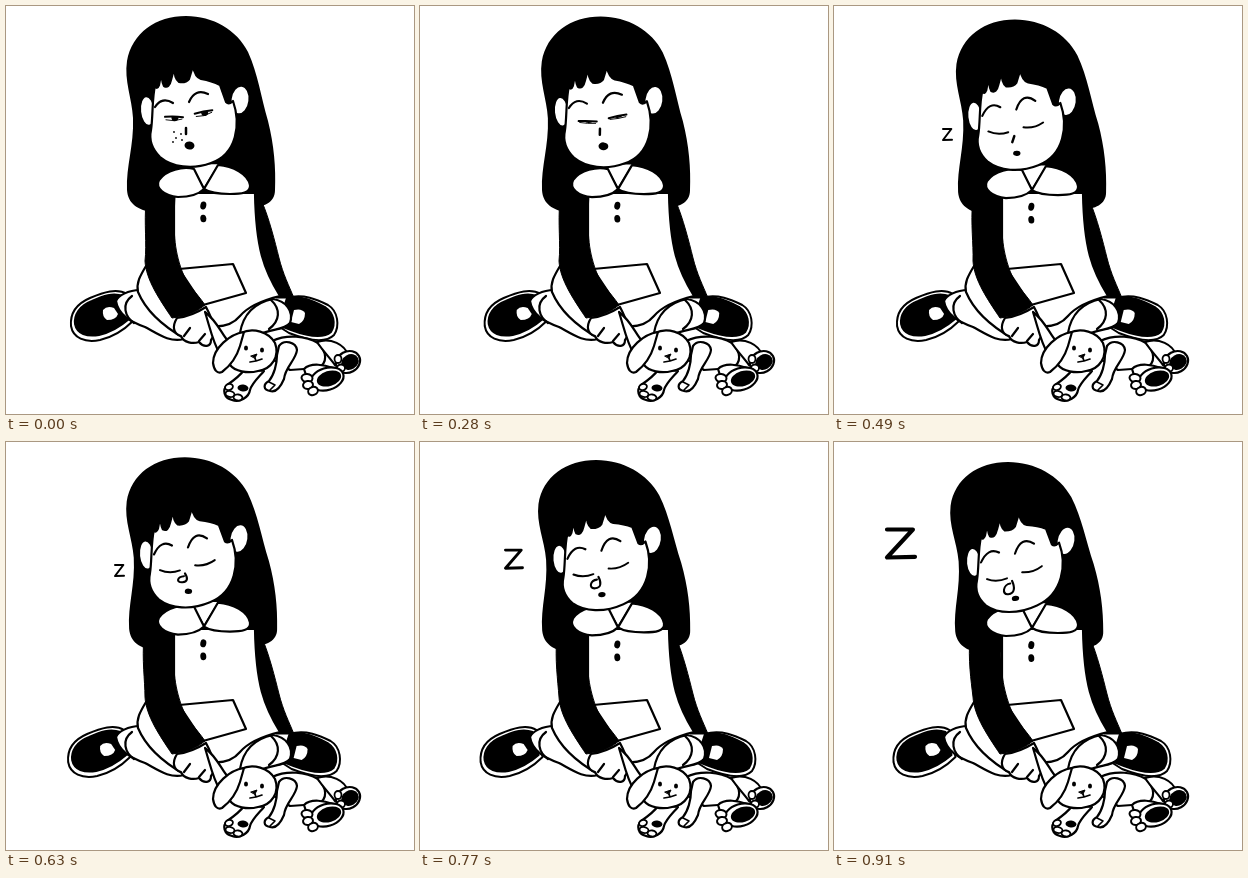
Write an HTML page with a canvas that moves like this. It is 408 by 408 pixels and loops after 980 ms.

```html
<!DOCTYPE html>
<html lang="en">
<head>
<meta charset="utf-8">
<title>Sleepy girl</title>
<style>
html, body { margin: 0; width: 100%; height: 100%; overflow: hidden; background: #fff; }
canvas { display: block; }
</style>
</head>
<body>
<canvas id="stage" width="408" height="408"></canvas>
<script>
const ctx = document.getElementById('stage').getContext('2d');
const LOOP = 980;

// start ms, nod, droop of features, eyelid, hair sway, Z progress, bubble size
const STEPS = [
  [0, 0, 0, 0, 0, -1, 0],
  [140, 0, 0, .3, 0, -1, 0],
  [210, 0, 0, .6, 0, -1, 0],
  [280, .05, .04, .8, 1, -1, 0],
  [350, .12, .1, 1, 2, -1, 0],
  [490, .35, .6, 1, 3, 0, 0],
  [630, .52, .65, 1, 2, 0, .3],
  [700, .66, .69, 1, 1.5, .24, .5],
  [770, .8, .74, 1, 1, .42, .7],
  [840, .9, .87, 1, .5, .7, .85],
  [910, 1, 1, 1, 0, 1, 1]
];

const mix = (a, b, k) => a + (b - a) * k;

function shape(d, fill = '#fff', line = 2.2) {
  const path = new Path2D(d);
  if (fill) { ctx.fillStyle = fill; ctx.fill(path); }
  if (line) { ctx.lineWidth = line; ctx.stroke(path); }
}
const stroke = (d, w = 2.2) => shape(d, null, w);

function oval(x, y, rx, ry, turn = 0, fill = '#000', line = 0) {
  ctx.beginPath();
  ctx.ellipse(x, y, rx, ry, turn, 0, 7);
  ctx.fillStyle = fill;
  ctx.fill();
  if (line) { ctx.lineWidth = line; ctx.stroke(); }
}

function within(matrix, draw) {
  ctx.save();
  ctx.transform(...matrix);
  draw();
  ctx.restore();
}
const shifted = (x, y, draw) => within([1, 0, 0, 1, x, y], draw);

function hair() {
  shape('M180 10C150 10 126 27 121 55C118 75 126 92 127 112C128 140 120 160 121 184C122 198 132 204 146 206L245 202C257 201 269 197 269 184C270 162 268 139 262 115C255 91 252 68 242 46C231 24 207 10 180 10Z', '#000', 0);
}

function leftShoe() {
  shape('M121 288C111 282 98 286 84 292C70 298 64 308 65 320C67 332 79 337 94 334C107 331 119 323 127 315Z', '#fff', 2);
  shape('M117 290C107 286 97 290 86 295C73 300 68 309 69 318C71 328 81 331 93 329C106 326 115 320 123 313Z', '#000', 2);
  shape('M97 304Q101 299 108 302L112 308Q110 314 101 314Q96 311 97 304Z', '#fff', 0);
}

function rightShoe() {
  shape('M281 292C297 287 312 294 322 299C332 305 334 320 328 329C319 338 301 334 283 327L272 320Z', '#fff', 2);
  shape('M282 292C296 289 309 296 319 301C328 307 330 318 325 326C317 333 301 330 285 324L272 319Z', '#000', 2);
  shape('M288 304Q296 302 299 307Q299 315 293 318L285 316Z', '#fff', 0);
}

function legs(nod) {
  shifted(-5.5 * nod, 0, leftShoe);
  shifted(5 * nod, 0, rightShoe);
  shape('M134 284C122 284 112 290 110 295C112 309 125 316 139 321C152 328 164 337 178 333L190 320L165 300Z');
  stroke('M126 290C115 298 119 311 128 317');
  shape('M234 327C237 309 248 297 267 293C280 295 288 305 284 317C279 324 265 323 255 328Z');
  stroke('M265 294C275 303 274 315 263 323');
}

function dress(nod) {
  shape('M246 188L256 196C263 212 269 236 273 252C277 268 283 280 288 292L270 292L246 230Z', '#000', 1);
  shape('M140 260C134 270 130 277 132 286C140 305 155 319 178 332L205 320Q224 322 234 310Q245 297 274 290C258 264 250 243 249 187L168 187L168 240Z');
  shape('M173 263L227 258L240 287L197 299Z');
  shifted(0, 3.6 * nod, () => {
    oval(197.3, 199.5, 3, 4, .2);
    oval(197.3, 212.5, 3, 3.8, -.1);
  });
  const x = 140 - 4 * nod;
  shape(`M${x} 195C${x - 2} 218 ${x + 1} 238 139 255C140 274 154 294 166 312Q186 310 199 299C191 287 181 279 176 265C168 243 ${167 - nod} 225 ${169 - 2 * nod} 190Z`, '#000', 1);
}

function collar(nod) {
  shifted(0, 3 * nod, () => {
    shape('M184 158L198 183L214 157Z');
    shape('M188 163C177 160 160 164 153 174C149 182 158 190 172 191C184 191 193 188 198 183Z');
    shape('M212 159C227 160 242 168 244 179C245 187 235 188 224 188C212 188 204 187 198 183Z');
  });
}

function hand() {
  shape('M171 312C166 320 167 328 175 330C178 337 187 338 193 336C198 342 205 341 205 334C211 327 208 316 200 301Q186 310 171 312Z');
  stroke('M178 330L184 322M193 335L199 328');
}

function doll() {
  // ear in her hand, then body and limbs
  shape('M199 306C204 322 207 337 214 348L222 335C215 327 211 315 199 306Z');
  shape('M266 335C281 328 300 330 312 337C321 346 322 357 312 362L284 364L268 354Z');
  shape('M311 336C325 331 339 339 342 349L329 359C324 352 317 345 311 336Z');
  oval(342, 356, 12.5, 10.5, -.5, '#fff', 2.2);
  oval(344, 356, 9, 7.5, -.5);
  oval(332, 353, 3.5, 4, 0, '#fff', 1.8);
  oval(335, 362, 4, 3.5, 0, '#fff', 1.8);
  shape('M298 363C305 356 319 359 327 362L321 378L302 375Z');
  oval(321, 373, 17, 11, -.3, '#fff', 2.2);
  oval(323, 372.5, 12.5, 7.5, -.3);
  oval(301, 372, 5.5, 4, .1, '#fff', 2);
  oval(302, 379, 5, 4, -.2, '#fff', 2);
  oval(307, 385, 5, 4, -.4, '#fff', 2);
  shape('M239 363C233 371 227 375 221 379C216 384 218 392 226 394C234 397 243 391 244 384C246 377 253 371 258 365Z');
  oval(237, 382, 5.5, 3.5, .1);
  oval(223, 381, 4, 3, -.3, '#fff', 1.8);
  oval(224, 388, 4.5, 3, .2, '#fff', 1.8);
  oval(232, 391.5, 4.5, 3, .1, '#fff', 1.8);
  shape('M273 340C278 333 290 336 291 344C290 354 279 361 278 373C275 380 270 387 264 385C257 384 257 378 263 375C268 369 271 358 271 349Z');
  stroke('M263 376L269 379M264 384L269 379', 1.6);
  shape('M235 327C247 321 263 326 269 337C274 350 266 363 252 365C241 368 229 365 224 359Z');
  shape('M238 326C224 328 207 342 207 357C208 364 211 368 216 366C224 360 231 350 234 340Z');
  oval(240, 342, 2, 2.6);
  oval(256, 344, 2, 2.6);
  shape('M245 350L251 348L249 352Z', '#000', 1);
  stroke('M249 352L250 355M244 356L250 355L256 353', 1.7);
}

function head() {
  oval(141.5, 105, 7.5, 15, -.1, '#fff', 2.2);
  oval(234, 94, 9.5, 14.5, .12, '#fff', 2.2);
  shape('M145 124C147 112 146 91 149 80Q151 84 153 79L156 63Q155 74 158 80Q163 83 165 74L168.5 61Q168 72 173 76Q180 77 183 73L187 60Q189 71 195 73Q206 75 214 79L220 96Q223 99 227 95C235 118 231 148 205 157C186 164 166 161 154 151C146 143 143 133 145 124Z');
}

function brows(sleep) {
  const lift = 2 * sleep;
  stroke(`M149 ${101 + lift}Q156 ${90 - lift} 167 ${97 - lift}`);
  stroke(`M183 ${96 + lift}Q189 ${82 - lift} 202 ${88 + lift}`);
}

function eye(x, y, tilt, lid, sleep) {
  ctx.save();
  ctx.translate(x, y);
  ctx.rotate(tilt);
  if (lid < 1) {
    ctx.save();
    ctx.beginPath();
    ctx.rect(-10, 0, 20, 8);
    ctx.clip();
    oval(1, 0, 3.6, mix(4.2, 1, lid));
    ctx.restore();
    stroke(`M-8 ${mix(3, 1, lid)}Q0 ${mix(5, 2, lid)} 8 2`, .9);
  }
  stroke(`M${-9 - sleep} 0Q0 ${mix(-1, 4, sleep)} ${9 + sleep} 0`, 2);
  ctx.restore();
}

function features(lid, sleep, bubble) {
  eye(168 - 3 * sleep, 111 + 4 * lid + 2 * sleep, .02 + .06 * sleep, lid, sleep);
  eye(197.5 + 2.5 * sleep, 106 + 4.5 * lid + sleep, -.2, lid, sleep);
  if (bubble) {
    const r = 2 + 3.4 * bubble;
    const y = 126 + 3 * bubble;
    shape(`M180 121C183 ${y - 1} 183 ${y + r} ${179 - r / 2} ${y + r}C${172 - r / 2} ${y + r} ${174 - r / 2} ${y - r} ${180 - r / 3} ${y - r}`, '#fff', 2.1);
  } else {
    stroke(`M${180 + sleep} 122L${180 - sleep} 128`, 2.5);
  }
  oval(183.5, 139.5, mix(5, 3.7, sleep), mix(4, 2.7, sleep), .1);
}

function freckles() {
  [[168, 126], [175, 128], [170, 132], [176, 134], [167, 136]]
    .forEach(([x, y]) => oval(x, y, .9, .9));
}

function snore(k) {
  const x = mix(113.5, 67, k), y = mix(128.5, 101.5, k);
  const w = mix(4.5, 14, k), h = mix(5.5, 14, k);
  stroke(`M${x - w} ${y - h}L${x + w * .85} ${y - h}L${x - w} ${y + h}L${x + w} ${y + h * .95}`, mix(2, 4.2, k));
}

function draw(ms) {
  const [, nod, droop, lid, sway, z, bubble] = STEPS.filter(s => s[0] <= ms).pop();
  const sleep = Math.min(1, droop / .6);
  ctx.fillStyle = '#fff';
  ctx.fillRect(0, 0, 408, 408);
  ctx.strokeStyle = '#000';
  ctx.lineCap = ctx.lineJoin = 'round';

  within([1, 0, .036 * nod, 1 - .026 * nod, sway - 6.4 * nod, 10.3 * nod], hair);
  legs(nod);
  dress(nod);
  collar(nod);
  hand();
  doll();
  within([1, -.1175 * nod, 0, 1 - .0284 * nod, -2 * nod, 35 * nod], () => {
    head();
    shifted(0, 3 * droop, () => brows(sleep));
    shifted(0, 7.6 * droop, () => features(lid, sleep, bubble));
    if (ms < 140) freckles();
  });
  if (z >= 0) snore(z);
}

function tick() {
  draw(performance.now() % LOOP);
  requestAnimationFrame(tick);
}
tick();
</script>
</body>
</html>
```
